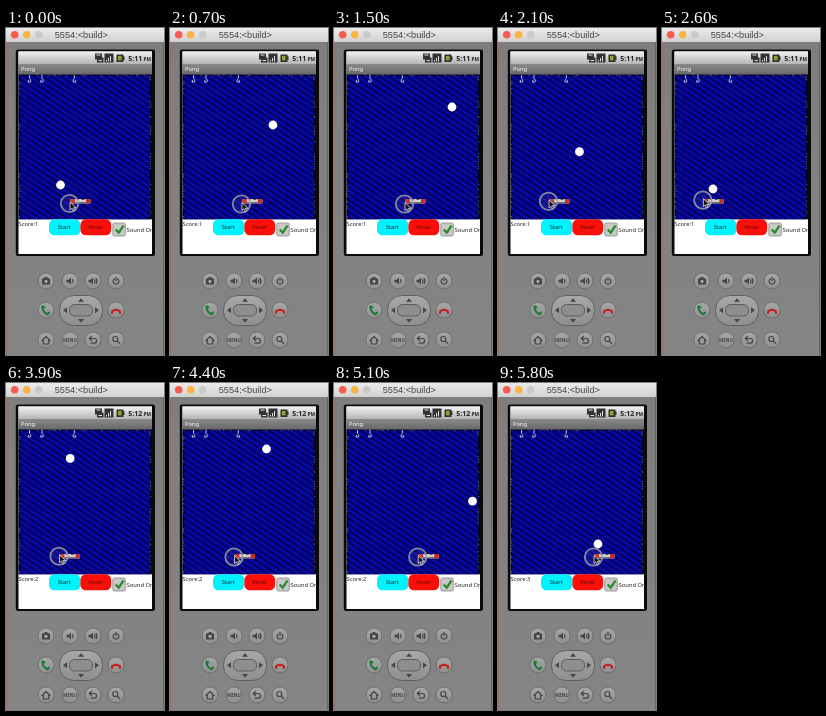
Recreate the animation shown at these times as an HTML page. Size 158 by 327 pixels, loop 5.9 s.

```html
<!DOCTYPE html>
<html lang="en">
<head>
<meta charset="utf-8">
<title>Pong</title>
<style>
  html, body { margin: 0; width: 100%; height: 100%; overflow: hidden; background: #828282; }
  svg { display: block; width: 158px; height: 327px; }
  text { font: 5.8px "Noto Sans", "Open Sans", sans-serif; fill: #222; }
  .window-title { font: 9.2px "Liberation Sans", Arial, sans-serif; fill: #444; text-anchor: middle; }
  .clock { font-size: 7px; font-weight: 700; text-anchor: end; }
  .clock .half { font-size: 4.8px; }
  .button { text-anchor: middle; }
  .line { fill: none; stroke: #444; stroke-width: 1.2; stroke-linejoin: round; stroke-linecap: round; }
  .solid { fill: #444; }
</style>
</head>
<body>
<svg viewBox="0 0 158 327">
  <defs>
    <linearGradient id="bar" x2="0" y2="1">
      <stop stop-color="#ebebeb"/><stop offset="1" stop-color="#d2d2d2"/>
    </linearGradient>
    <linearGradient id="body" x2="0" y2="1">
      <stop stop-color="#7e7e7e"/><stop offset="1" stop-color="#858585"/>
    </linearGradient>
    <linearGradient id="status" x2="0" y2="1">
      <stop stop-color="#f2f2f2"/><stop offset="1" stop-color="#b4b4b4"/>
    </linearGradient>
    <linearGradient id="heading" x2="0" y2="1">
      <stop stop-color="#8a8a8a"/><stop offset="1" stop-color="#686868"/>
    </linearGradient>
    <linearGradient id="key" x2="0" y2="1">
      <stop stop-color="#a8a8a8"/><stop offset="1" stop-color="#8e8e8e"/>
    </linearGradient>
    <pattern id="water" width="9" height="6" patternUnits="userSpaceOnUse">
      <rect width="9" height="6" fill="#04049a"/>
      <path d="M-1-.7L10 6.7M-1 5.3L2 7.3M7-1.3L10 .7" stroke="#020258" stroke-width="1.8"/>
      <path d="M4 0Q7 .5 8 2.5M0 3Q3 3.5 4 5.5" fill="none" stroke="#1212b8" stroke-width=".8"/>
    </pattern>
    <path id="hook" d="M0 0V3.5Q2.2 5 1 7H-1.6L-.8 5" fill="none" stroke="#b9d2e2" stroke-width=".9"/>
  </defs>

  <rect width="158" height="327" fill="url(#body)"/>
  <path d="M.5 14V327" stroke="#946f68"/>
  <path d="M157.5 14V327" stroke="#666"/>
  <rect width="158" height="14" fill="url(#bar)"/>
  <circle cx="8.7" cy="6.8" r="3.8" fill="#fb5a50"/>
  <circle cx="20.7" cy="6.8" r="3.8" fill="#fcb440"/>
  <circle cx="32.8" cy="6.8" r="3.8" fill="#c9c9c9"/>
  <text class="window-title" x="75.3" y="10">5554:&lt;build&gt;</text>

  <rect x="9.8" y="21.5" width="139.2" height="206.5" rx="2" fill="#0a0a0a"/>
  <rect x="12.5" y="23.5" width="133.5" height="202.5" fill="#fff"/>
  <rect x="12.5" y="23.5" width="133.5" height="12.5" fill="url(#status)"/>
  <g fill="#333">
    <path d="M89 25.5h7v4h1.5v5H91v-3h-2z"/>
    <path d="M90.5 27h4M92.5 32.5h3.5" stroke="#ddd"/>
    <rect x="98.5" y="25.5" width="9" height="9"/>
    <path d="M100 32h1v1.5h-1zM102 30h1v3.5h-1zM104 28h1v5.5h-1z" fill="#ddd"/>
    <path d="M110.5 26.5h7v1.8h1v3.6h-1v2h-7z"/>
    <rect x="112" y="28" width="3.5" height="4.3" fill="#86a832"/>
  </g>
  <text class="clock" x="145" y="32.6"><tspan id="clock"></tspan><tspan class="half" dx="1.2">PM</tspan></text>
  <rect x="12.5" y="36" width="133.5" height="10.5" fill="url(#heading)"/>
  <text x="15" y="42.8" style="fill:#fff">Pong</text>

  <rect x="12.5" y="46.3" width="133.5" height="145" fill="#01012e"/>
  <rect x="14.3" y="47.8" width="129.7" height="143.4" fill="url(#water)"/>
  <g id="foam" stroke="#b9bcd0" stroke-width=".8"></g>
  <use href="#hook" x="23.5" y="47"/>
  <use href="#hook" x="36" y="47"/>
  <use href="#hook" transform="translate(68.3 47) scale(-1 1)"/>

  <g id="paddle">
    <rect x=".8" y="171" width="20.2" height="4.4" rx="1" fill="#d4d0d0"/>
    <path d="M.8 171h4.7v4.4H.8zM16.5 171h4.5v4.4h-4.5z" fill="#c0302a"/>
    <path d="M5.5 174.8h11M7 171.4h2M12 171.4h3" stroke="#444"/>
  </g>
  <circle id="ball" r="4.4" fill="#fff"/>

  <text id="score" x="12.5" y="197.8"></text>
  <rect x="43" y="191.3" width="31.4" height="16" rx="5.5" fill="#00f2ff"/>
  <text class="button" x="58.3" y="201.2">Start</text>
  <rect x="74.4" y="191.3" width="30.8" height="16" rx="5.5" fill="#fc0f08"/>
  <text class="button" x="89.7" y="201.2" style="fill:#6d0805">Reset</text>
  <rect x="106.8" y="195" width="12.5" height="13" rx="1.5" fill="#c9c9c9" stroke="#888" stroke-width=".8"/>
  <path d="M109.7 201.4l3 3.3 4.8-7.2" fill="none" stroke="#2c8c2c" stroke-width="2.3"/>
  <text x="120.6" y="204">Sound On</text>

  <g id="keys"></g>
  <rect x="53.5" y="267.5" width="43" height="30" rx="14" fill="url(#key)" stroke="#606060"/>
  <rect x="63.5" y="276.5" width="23" height="11.5" rx="5" fill="#8e8e8e" stroke="#555" stroke-width=".9"/>
  <path class="solid" d="M72 273.8l3-3.6 3 3.6zM72 291l3 3.6 3-3.6zM61 279.3l-4 3 4 3zM89 279.3l4 3-4 3z"/>

  <g transform="translate(40 253)">
    <path class="solid" d="M-4-2.5h2l1-1.5h2l1 1.5h2v6h-8z"/><circle cy=".4" r="1.6" fill="#aaa"/>
  </g>
  <g transform="translate(64 253)">
    <path class="solid" d="M-3.5-1.2h2l2.5-2.3v7L-1.5 1.2h-2z"/><path class="line" d="M2.5-1.3q1 1.3 0 2.6"/>
  </g>
  <g transform="translate(87 253)">
    <path class="solid" d="M-4.5-1.2h2L0-3.5v7L-2.5 1.2h-2z"/><path class="line" d="M1.5-1.3q1 1.3 0 2.6M3-2.6q2 2.6 0 5.2"/>
  </g>
  <path class="line" d="M108.3 250.9a2.9 2.9 0 1 0 3.4 0M110 249.3v3.4"/>
  <path d="M38.5 279.3l-2-1q-.5 5 5 8l1.5-1.8" fill="none" stroke="#147a34" stroke-width="2" stroke-linecap="round" stroke-linejoin="round"/>
  <path d="M106 285v-1.7q4-2.8 8 0v1.7" fill="none" stroke="#c4221e" stroke-width="2.2" stroke-linecap="round" stroke-linejoin="round"/>
  <path class="line" d="M36 312.5l4-4 4 4M37.3 312v4h5.4v-4"/>
  <text x="64" y="313.7" style="font-size:4.5px;font-weight:600;fill:#444;text-anchor:middle">MENU</text>
  <path class="line" d="M85.5 308.5l-2.3 2 2.3 2M83.5 310.5h4.5q2.6 0 2.6 2.3t-2.6 2.3h-3"/>
  <path class="line" d="M111.8 311a2.5 2.5 0 1 0-5 0 2.5 2.5 0 1 0 5 0M111.2 313l2.5 2.6"/>

  <g id="pointer">
    <circle r="8.7" fill="#fff" fill-opacity=".06" stroke="#9c9ca8" stroke-opacity=".85" stroke-width="1.8"/>
    <path d="M.5-1.5v8l1.9-1.7 1.4 3 1.4-.7-1.4-2.8h2.7z" fill="#111" stroke="#fff" stroke-width=".7"/>
  </g>
</svg>
<script>
const LOOP = 5900, STEP = 100;
const $ = id => document.getElementById(id);

// Each stop is [ms, x, y].
const ballPath = [
  [0, 54.5, 157], [700, 103, 97], [1200, 140, 52], [1500, 118, 79],
  [2600, 51, 161], [2670, 47, 166], [3174, 18, 129], [3400, 31, 113],
  [4213, 85, 52], [4400, 96.5, 66], [5125, 140, 120], [5735, 104, 166],
  [5800, 100, 161]
];
const pointerPath = [
  [0, 63.5, 175.5], [600, 71.5, 176], [1500, 70.5, 176], [2400, 40.5, 172],
  [3400, 42, 172.5], [4400, 64, 174], [5500, 95, 174], [5800, 95.5, 174]
];

function along(path, t) {
  const i = path.findIndex(stop => stop[0] >= t);
  if (i < 1) return path[i ? path.length - 1 : 0].slice(1);
  const [from, x0, y0] = path[i - 1], [to, x1, y1] = path[i];
  const k = (t - from) / (to - from);
  return [x0 + (x1 - x0) * k, y0 + (y1 - y0) * k];
}

const place = (id, x, y) => $(id).setAttribute("transform", `translate(${x} ${y})`);

function seeded(seed) {
  return () => (seed = seed * 16807 % 2147483647) / 2147483647;
}

function buildFoam() {
  const rnd = seeded(77);
  let marks = "";
  for (let y = 48; y < 190; y += 2.5)
    for (const x of [13, 144])
      if (rnd() < .55) marks += `M${x} ${y}l${rnd() * 1.4} ${rnd() * 2}`;
  for (let x = 13; x < 145; x += 2.5)
    if (rnd() < .5) marks += `M${x} 47l${rnd() * 2} ${rnd()}`;
  $("foam").innerHTML = `<path d="${marks}" opacity=".65"/>`;
}

function buildKeys() {
  let keys = "";
  for (const y of [253, 282, 312])
    for (const x of y === 282 ? [40, 110] : [40, 64, 87, 110])
      keys += `<circle cx="${x}" cy="${y}" r="8" fill="url(#key)" stroke="#666" stroke-width=".8"/>`;
  $("keys").innerHTML = keys;
}

function draw(t) {
  const [px, py] = along(pointerPath, t);
  place("ball", ...along(ballPath, t));
  place("pointer", px, py);
  place("paddle", px, 0);
  $("score").textContent = "Score:" + (t < 2700 ? 1 : t < 5800 ? 2 : 3);
  $("clock").textContent = t < 3900 ? "5:11" : "5:12";
}

buildFoam();
buildKeys();
draw(0);
const start = performance.now();
function tick() {
  const t = (performance.now() - start) % LOOP;
  draw(Math.floor(t / STEP) * STEP);
  requestAnimationFrame(tick);
}
requestAnimationFrame(tick);
</script>
</body>
</html>
```
